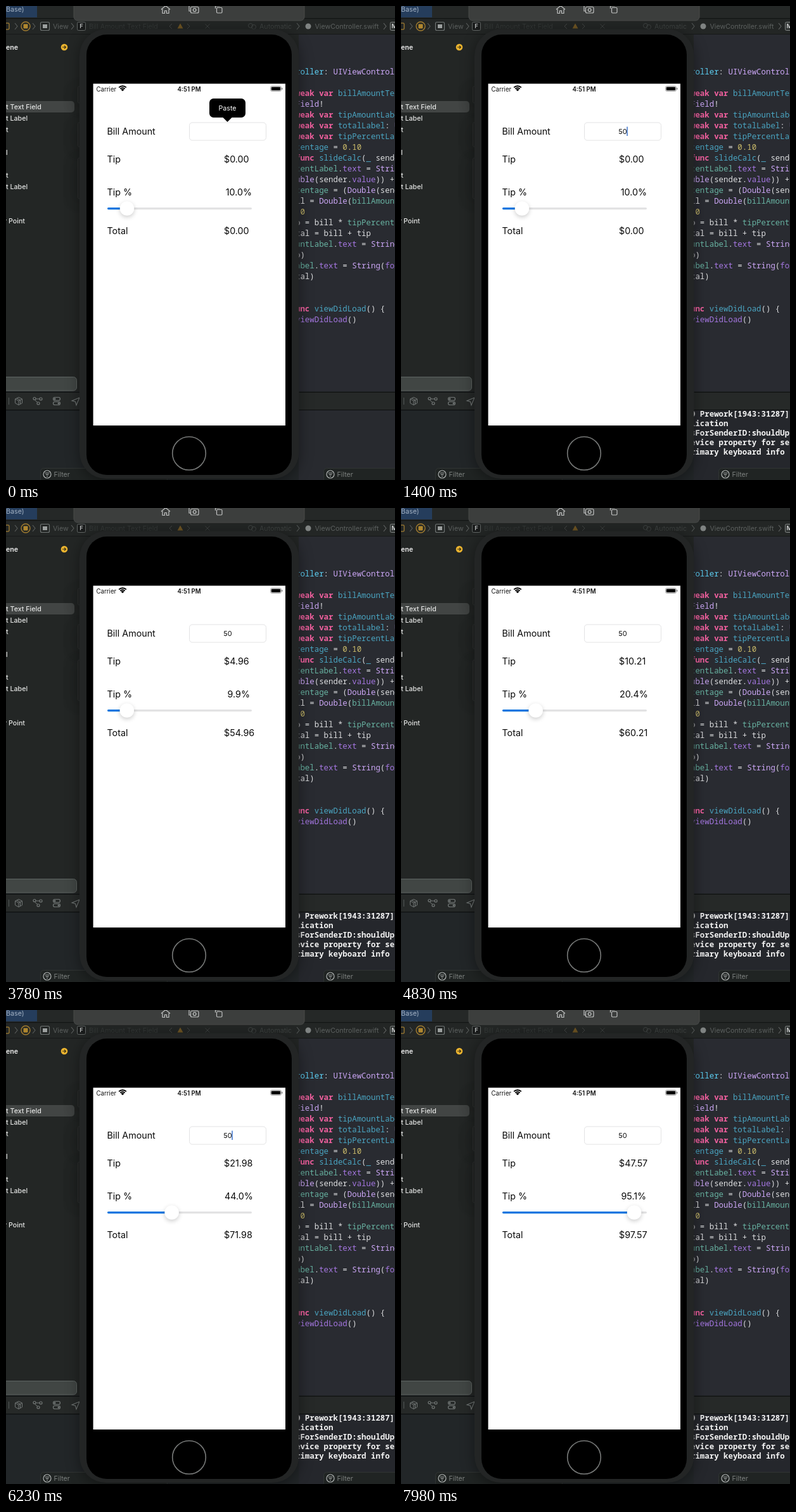
Animation of 614 by 748 pixels, one loop 8 s. Source, as an HTML page with a canvas:

```html
<!DOCTYPE html>
<html lang="en">
<head>
<meta charset="utf-8">
<title>Tip calculator</title>
<style>
html, body { margin: 0; width: 100%; height: 100%; overflow: hidden; background: #222524; }
canvas { display: block; width: 614px; height: 748px; }
</style>
</head>
<body>
<canvas id="stage" width="614" height="748"></canvas>
<script>
const ctx = document.getElementById('stage').getContext('2d');
const LOOP = 8000, STEP = 70;
const SANS = 'Inter, Roboto, sans-serif';
const MONO = '"Noto Sans Mono", "DejaVu Sans Mono", monospace';

// Slider percentage over time, linear between keys
const DRAG = [[3570, 10], [3780, 9.92], [4480, 9.92], [4830, 20.42], [5320, 38], [5670, 38],
  [6230, 43.96], [6510, 43.96], [6930, 62], [7000, 62], [7420, 80], [7700, 80], [7980, 95.14]];

const INK = { w: '#dcdddf', k: '#f2609f', t: '#cba6f5', c: '#5dd0f4', v: '#4aa5c2',
  g: '#68b3a2', p: '#a476e0', n: '#cdbd6b' };

// Each line: centre y, then pairs of ink and text
const CODE = [
  [104, 'c', 'roller', 'w', ': ', 't', 'UIViewController'],
  [138, 'k', 'weak var ', 'v', 'billAmountText'],
  [155, 't', 'Field', 'w', '!'],
  [172, 'k', 'weak var ', 'v', 'tipAmountLabel'],
  [189, 'k', 'weak var ', 'v', 'totalLabel', 'w', ': ', 't', 'UI'],
  [206, 'k', 'weak var ', 'v', 'tipPercentLabel'],
  [223, 'v', 'centage', 'w', ' = ', 'n', '0.10'],
  [240, 'k', 'func ', 'v', 'slideCalc', 'w', '(', 'v', '_', 'w', ' sender'],
  [257, 'g', 'centLabel', 'w', '.', 'p', 'text', 'w', ' = ', 't', 'String'],
  [274, 't', 'uble', 'w', '(sender.', 'p', 'value', 'w', ')) +'],
  [291, 'g', 'centage', 'w', ' = (', 't', 'Double', 'w', '(sender'],
  [308, 'w', 'll = ', 't', 'Double', 'w', '(', 'g', 'billAmount'],
  [325, 'n', ' 0'],
  [342, 'w', 'p = bill * ', 'g', 'tipPercent'],
  [359, 'w', 'tal = bill + tip'],
  [376, 'g', 'untLabel', 'w', '.', 'p', 'text', 'w', ' = ', 't', 'String'],
  [393, 'w', 'p)'],
  [410, 'g', 'abel', 'w', '.', 'p', 'text', 'w', ' = ', 't', 'String', 'w', '(', 'p', 'format'],
  [427, 'w', 'tal)'],
  [478, 'k', 'unc ', 'v', 'viewDidLoad', 'w', '() {'],
  [495, 'p', 'viewDidLoad', 'w', '()']
];
const LOG = ['0 Prework[1943:31287]', 'lication', 'sForSenderID:shouldUp',
  'evice property for se', 'rimary keyboard info'];
const OUTLINE = [['t Text Field', 159], ['t Label', 177], ['t', 195], ['l', 231], ['t', 267],
  ['t Label', 285]];

function rect(x, y, w, h, color) {
  ctx.fillStyle = color;
  ctx.fillRect(x, y, w, h);
}
function paint(fill, stroke, width) {
  if (fill) { ctx.fillStyle = fill; ctx.fill(); }
  if (stroke) { ctx.strokeStyle = stroke; ctx.lineWidth = width; ctx.stroke(); }
}
function round(x, y, w, h, r, fill, stroke, width = 1) {
  ctx.beginPath();
  ctx.roundRect(x, y, w, h, r);
  paint(fill, stroke, width);
}
function circle(x, y, r, fill, stroke, width = 1) {
  ctx.beginPath();
  ctx.arc(x, y, r, 0, Math.PI * 2);
  paint(fill, stroke, width);
}
function path(d, stroke, width = 1, fill) {
  const p = new Path2D(d);
  if (fill) { ctx.fillStyle = fill; ctx.fill(p); }
  if (stroke) { ctx.strokeStyle = stroke; ctx.lineWidth = width; ctx.stroke(p); }
}
// y is the middle of the capitals
function text(s, x, y, size, color, weight = 400, align = 'left', family = SANS) {
  ctx.font = `${weight} ${size}px ${family}`;
  ctx.textAlign = align;
  ctx.fillStyle = color;
  ctx.fillText(s, x, y + size * 0.364);
}
function mono(s, x, y, color, weight) {
  text(s, x, y - 0.7, 12.4, color, weight, 'left', MONO);
}
function chevron(x, color) {
  path(`M${x - 2} 27l4 5l-4 5`, color, 1.1);
}

function drawEditor() {
  rect(0, 0, 614, 748, '#232625');
  rect(462, 45, 152, 564, '#292b31');
  for (const [y, ...parts] of CODE) {
    let x = 457;
    for (let i = 0; i < parts.length; i += 2) {
      const ink = parts[i];
      mono(parts[i + 1], x, y, INK[ink], ink === 'k' ? 700 : 500);
      x += ctx.measureText(parts[i + 1]).width;
    }
  }
}

function drawSidebar() {
  text('ene', 0, 65, 10.7, '#ececec', 600);
  round(-8, 150, 116, 18, 5, '#424544');
  for (const [label, y] of OUTLINE) text(label, 0, y, 10.7, '#e4e5e4', 500);
  text('r Point', -3, 339, 10.7, '#e4e5e4', 500);
  circle(92, 65, 5.3, '#eab32f');
  path('M89 65h5M92 62.8l2.4 2.2l-2.4 2.2', '#3a3014', 1.2);
  round(-8, 585.5, 119.5, 21.5, 5, '#414644', '#5e6462');
}

function drawBars() {
  rect(0, 0, 614, 20, '#252827');
  rect(0, 0, 49, 18, '#253d5c');
  text('Base)', 0, 5, 10.7, '#a3b2c4');
  rect(0, 19, 614, 1.5, '#131515');
  rect(0, 20.5, 614, 24, '#232625');
  rect(0, 44, 614, 1, '#171919');
  round(-6, 27, 11, 10, 2, null, '#8f7030', 1.5);
  for (const x of [16, 44, 105]) chevron(x, '#5a5e5d');
  circle(31, 32, 7, null, '#a37d30', 1.4);
  round(27.5, 28.5, 7, 7, 1, '#b0872f');
  round(54.5, 25.5, 14, 13, 2, null, '#6f7473', 1.2);
  rect(58, 29, 7, 6, '#9ca09f');
  text('View', 74, 32, 10.7, '#5b5f5e');
  round(112.5, 25.5, 13, 13, 2, '#1a1c1c', '#626665');
  text('F', 119, 32, 9.5, '#b8baba', 600, 'center');
  text('Bill Amount Text Field', 131, 32, 10.7, '#343837');
  path('M262 28l-4 4l4 4M286 28l4 4l-4 4', '#434645');
  path('M275 27.5l4.5 8h-9z', null, 1, '#6f5524');
  path('M314.5 28.5l7 7m0-7l-7 7', '#3b3f3e');
  circle(386, 31, 3.5, null, '#3f4342');
  circle(391, 33, 3.5, null, '#3f4342');
  text('Automatic', 400, 32, 10.7, '#3f4342');
  chevron(461, '#525655');
  circle(477, 32, 4.5, '#7f8382');
  text('ViewController.swift', 487.5, 32, 10.7, '#5c605f');
  chevron(598, '#606463');
  round(606.5, 25.5, 13, 13, 2, '#303433', '#828685');
  text('M', 608.5, 32, 9.5, '#d0d2d2', 600);
}

function drawDebug(logged) {
  rect(0, 608, 614, 140, '#222628');
  rect(0, 609, 614, 1, '#0d0f0f');
  rect(0, 610, 614, 27, '#262928');
  rect(0, 637, 614, 1.2, '#0d0f0f');
  rect(462, 638, 152, 110, logged ? '#25272c' : '#282a2f');
  const c = '#727776';
  rect(4, 618, 1, 11, '#525756');
  path('M20 617.5l5.5 2.7v6.5l-5.5 3l-5.5-3v-6.5zM14.5 620.2l5.5 3l5.5-3M20 623.2v6.5M17 619l5.5 3v6', c);
  path('M46 620h8M45.5 622l5 4', c);
  for (const [x, y] of [[45, 619.5], [55, 620], [51, 627]]) circle(x, y, 2, '#262928', c, 1.2);
  round(74.5, 617.5, 11, 5, 2.5, null, c, 1.2);
  round(74.5, 624.5, 11, 5, 2.5, null, c, 1.2);
  circle(77, 620, 1.5, c);
  circle(83, 627, 1.5, c);
  path('M104 623l12-5l-5 12l-1.5-5.5z', c, 1.1);
  if (logged) LOG.forEach((s, i) => mono(s, 457, 644 + i * 15, '#f3f3f3', 700));
  filter(55);
  filter(502);
}
function filter(x) {
  const cx = x + 10, y = 739;
  round(x - 0.5, 729.5, 200, 22, 5, '#202423', '#313534');
  circle(cx, y, 6, null, '#b0b4b3', 1.2);
  path(`M${cx - 3.5} ${y - 2}h7M${cx - 2.3} ${y + 0.5}h4.6M${cx - 1} ${y + 3}h2`, '#b0b4b3', 1.2);
  text('Filter', x + 20.5, y, 10.7, '#7c807f');
}

function drawDevice() {
  ctx.save();
  ctx.shadowColor = 'rgba(0,0,0,.4)';
  ctx.shadowBlur = 22;
  ctx.shadowOffsetY = 4;
  for (const [y, h] of [[127, 26], [184, 38], [240, 64]]) round(113.5, y, 5, h, 1.5, '#232625', '#2f3231');
  round(116, 36.5, 346.5, 709.5, 42, '#232525');
  ctx.restore();
  round(127, 45, 324, 695, 32, '#000');
  round(107, -12, 364, 35, 6, '#3c3e3d', '#484a49');

  const c = '#c2c4c3';
  path('M245 5.5l7-6l7 6M247 5v6.5h3.5v-4h3v4h3.5v-6.5', c, 1.2);
  path('M292 -1h-3v9h3', c, 1.2);
  round(291.5, 1.5, 12.5, 9.5, 2, '#3c3e3d', c, 1.2);
  circle(297.7, 6.3, 2.4, null, c, 1.2);
  round(332.5, 2.5, 8.5, 8.5, 1.5, null, c, 1.2);
  path('M330.5 4v-4h7', c, 1.2);

  rect(137.6, 122.6, 303.4, 539.4, '#fff');
  circle(289, 706, 26.3, null, '#777978', 1.6);
}

function drawStatus() {
  text('Carrier', 142.5, 131, 9.7, '#111');
  for (const r of [2, 5.2, 8.2]) {
    ctx.beginPath();
    ctx.arc(184, 134.5, r, -Math.PI * 0.75, -Math.PI * 0.25);
    paint(null, '#000', r < 3 ? 3 : 1.9);
  }
  text('4:51 PM', 289, 131, 9.7, '#111', 600, 'center');
  round(417.5, 126.5, 17, 8, 2.2, null, '#8a8a8a', 0.8);
  round(418.7, 127.7, 14.6, 5.6, 1.2, '#000');
  round(435.3, 129, 1.2, 3, 0.6, '#777');
}

function percentAt(t) {
  if (t <= DRAG[0][0]) return DRAG[0][1];
  for (let i = 1; i < DRAG.length; i++) {
    const [t0, v0] = DRAG[i - 1], [t1, v1] = DRAG[i];
    if (t <= t1) return v0 + (v1 - v0) * (t - t0) / (t1 - t0);
  }
  return DRAG[DRAG.length - 1][1];
}

function caretAlpha(t) {
  if (t < 280) return 0;
  if (t < 1540) return Math.min(1, (t - 210) / 210);
  const p = (t - 1540) % 1010;
  if (p < 140) return 1 - (p + STEP) / 210;
  if (p < 420) return 0;
  return Math.min(1, (p - 350) / 210);
}

function drawForm(t) {
  const size = 14.3, black = '#0a0a0a';
  const percent = percentAt(t);
  const bill = t < 840 ? '' : t < 1330 ? '5' : '50';
  const tip = t < 3640 ? 0 : percent / 2;
  const total = t < 3640 ? 0 : 50 + tip;

  text('Bill Amount', 159.5, 198, size, black);
  text('Tip', 159.5, 242, size, black);
  text('Tip %', 159.5, 294, size, black);
  text('Total', 159.5, 355, size, black);
  text('$' + tip.toFixed(2), 344, 242, size, black);
  text(percent.toFixed(1) + '%', 367.3, 294, size, black, 400, 'center');
  text('$' + total.toFixed(2), 344, 355, size, black);

  round(289.5, 184, 121, 28, 4.5, '#fff', '#e3e3e4');
  text(bill, 350, 198, 10.9, black, 400, 'center');
  ctx.globalAlpha = caretAlpha(t);
  rect(349.5 + bill.length * 3.4, 190.5, 1.5, 14.5, '#3d74cc');
  ctx.globalAlpha = 1;

  const x = 170.2 + percent * 2.08;
  round(160, 318, 228, 3.2, 1.6, '#e2e2e3');
  round(160, 318, x - 160, 3.2, 1.6, '#0f76e0');
  ctx.save();
  ctx.shadowColor = 'rgba(0,0,0,.2)';
  ctx.shadowBlur = 7;
  ctx.shadowOffsetY = 2.5;
  circle(x, 319.5, 11.3, '#fff');
  ctx.restore();
}

function drawPaste(t) {
  const alpha = t < 280 ? 1 : Math.max(0, 1 - (t - 210) / 280);
  if (!alpha) return;
  ctx.globalAlpha = alpha;
  round(321, 146, 57, 30, 6.5, '#000');
  path('M342 175.5h15l-7.5 7.5z', null, 1, '#000');
  text('Paste', 349.5, 161, 10.7, '#fff', 400, 'center');
  ctx.globalAlpha = 1;
}

function draw(now) {
  const t = Math.floor((now % LOOP) / STEP) * STEP;
  drawEditor();
  drawSidebar();
  drawBars();
  drawDebug(t >= 1050);
  drawDevice();
  drawStatus();
  drawForm(t);
  drawPaste(t);
}

const start = performance.now();
function tick() {
  draw(performance.now() - start);
  requestAnimationFrame(tick);
}
tick();
</script>
</body>
</html>
```
